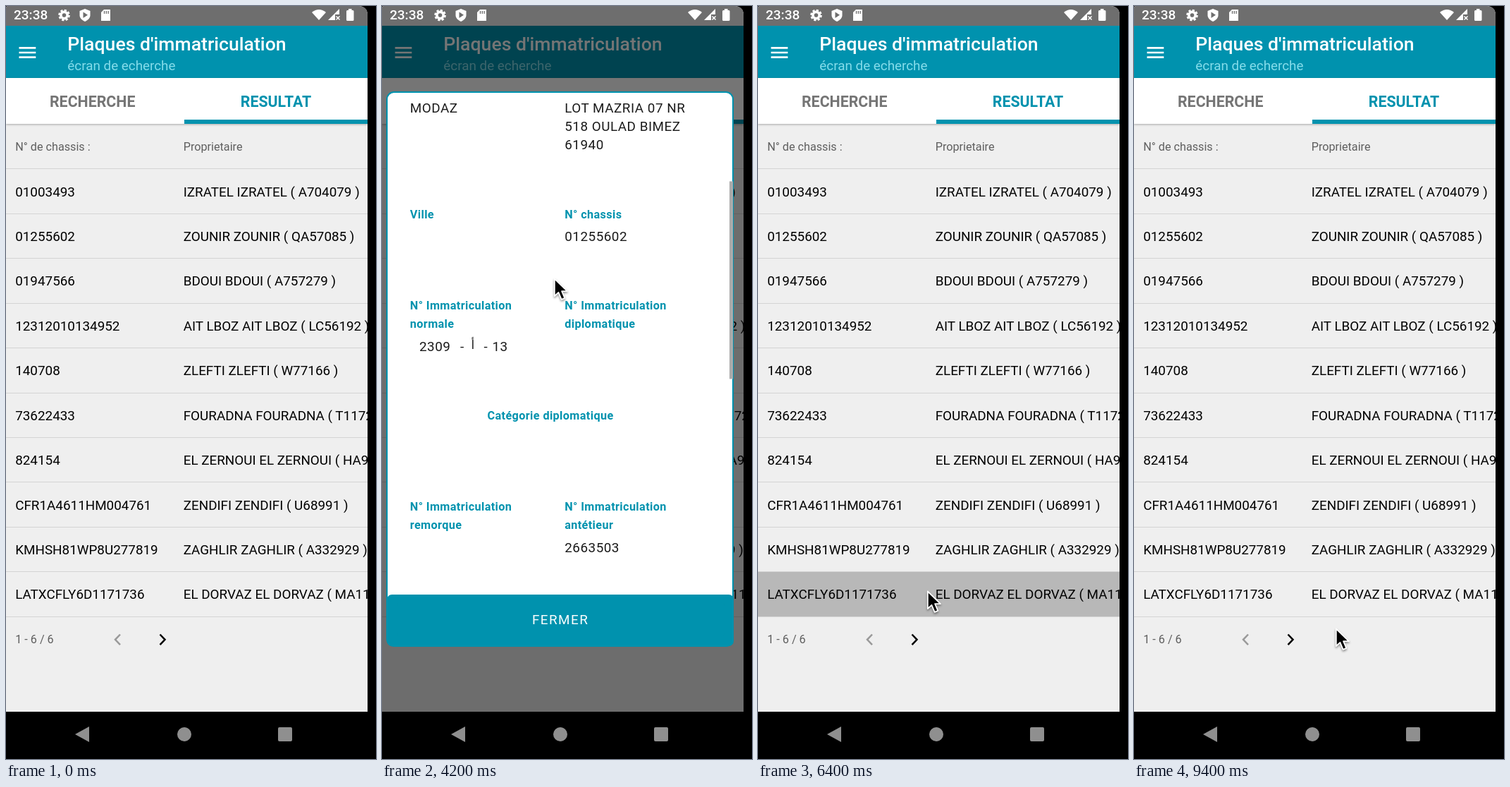
An HTML page for the animation above (9.5 s loop, 525 by 1067 pixels).

```html
<!DOCTYPE html>
<html lang="fr">
<head>
<meta charset="utf-8">
<title>Plaques d'immatriculation</title>
<style>
:root { --teal: #0092ae; }
html, body { margin: 0; width: 100%; height: 100%; overflow: hidden; background: #000; }
body { position: relative; font: 18.85px/26px Roboto, "DejaVu Sans", sans-serif; color: #000; }
div, span, svg { position: absolute; }
span { white-space: pre; line-height: 26px; }
svg { left: 0; top: 0; overflow: visible; }
#screen { left: 0; top: 0; width: 513px; height: 1000px; overflow: hidden; background: #efefef; border-radius: 3px 12px 0 0; }
#status { left: 0; top: 0; width: 513px; height: 28px; background: #6e6e6e; }
#bar { left: 0; top: 28px; width: 513px; height: 74px; background: var(--teal); }
#tabs { left: 0; top: 102px; width: 513px; height: 65px; background: #fff; box-shadow: 0 1px 3px rgba(0,0,0,.3); }
#ink { left: 253px; top: 161px; width: 260px; height: 6px; background: var(--teal); }
.clock { font-size: 19px; font-weight: 500; color: #fff; }
.title { font-size: 26.6px; font-weight: 500; color: #fff; }
.sub { color: #84dcea; }
.tab { font-size: 21.35px; font-weight: 700; color: #757575; }
.on { color: var(--teal); }
.small { font-size: 16.2px; color: #5f5f5f; }
.line { left: 0; width: 513px; height: 1px; background: #d4d4d4; }
.press { left: 0; width: 513px; height: 64px; background: rgba(0,0,0,.23); opacity: 0; }
.shade { left: 0; top: 28px; width: 513px; height: 972px; background: rgba(0,0,0,.54); }
.panel { left: 6px; top: 121px; width: 493px; height: 787px; box-sizing: border-box; border: 2px solid var(--teal); border-radius: 11px; background: #fff; }
.view { left: 8px; top: 122px; width: 491px; height: 713px; overflow: hidden; }
.body { left: -8px; top: -122px; width: 513px; height: 1805px; color: #1a1a1a; letter-spacing: .52px; }
.label { font-size: 16.2px; font-weight: 700; letter-spacing: .4px; color: var(--teal); }
.alef { font-family: "DejaVu Sans", sans-serif; font-size: 17px; }
.thumb { left: 485px; top: 1px; width: 5px; height: 280px; background: #ababab; }
.foot { left: 7px; top: 834px; width: 492px; height: 73px; border-radius: 7px; background: var(--teal); }
.btn { left: 21px; top: 845px; width: 465px; height: 49px; border-radius: 5px; background: var(--teal); }
.btn span { left: 192px; top: 11.5px; color: #fff; letter-spacing: 1.45px; }
.fade { opacity: 0; }
#cursor { filter: drop-shadow(0 2px 1.5px rgba(0,0,0,.4)); opacity: 0; }
</style>
</head>
<body>
<div id="screen">
  <div id="status"></div>
  <div id="bar"></div>
  <div id="tabs"></div>
  <div id="ink"></div>
  <svg width="513" height="1000">
    <g fill="#fff">
      <g fill="none" stroke="#fff">
        <circle cx="82.5" cy="13" r="4.6" stroke-width="3.6"/>
        <circle cx="82.5" cy="13" r="7" stroke-width="2.6" stroke-dasharray="3.2 2.3"/>
      </g>
      <path d="M112 4l7.5 3v6c0 4-3 7-7.5 9c-4.5-2-7.5-5-7.5-9V7z"/>
      <path d="M109.5 8.5v8.5l6.5-4.25z" fill="#6e6e6e"/>
      <path d="M139 5h9v16h-13V9z"/>
      <path d="M139.5 7v4m2.8-4v4m2.8-4v4" stroke="#6e6e6e" stroke-width="1.3"/>
      <path d="M434 9Q444 1 454 9L444 20z"/>
      <path d="M473 4v8h-6v8h-10z"/>
      <path d="M468.5 14.5l5 5m0-5l-5 5" stroke="#fff" stroke-width="1.5"/>
      <path d="M486 4h4.5v2h1.500q1.5 0 1.5 1.5v12q0 1.5-1.5 1.5h-7.5q-1.5 0-1.5-1.5v-12q0-1.5 1.5-1.5h1.500z"/>
    </g>
    <path d="M18.5 59.4h23.8m-23.8 6.6h23.8m-23.8 6.6h23.8" stroke="#fff" stroke-width="2.6"/>
    <g fill="none" stroke-width="2.5">
      <path d="M162 890.5l-7 7.3l7 7.3" stroke="#999"/>
      <path d="M218.5 890.5l7 7.3l-7 7.3" stroke="#000"/>
    </g>
  </svg>
</div>
<svg width="525" height="1067">
  <g fill="#8f8f8f">
    <path d="M98 1032l20-11v22z"/>
    <circle cx="253" cy="1032" r="10"/>
    <rect x="386" y="1022" width="20" height="20" rx="2"/>
  </g>
</svg>
<svg id="cursor" width="24" height="36">
  <path d="M.8 1.5V26l5.6-5.2l4.3 10l4.6-2l-4.2-9.7h7.8z" stroke="#fff" stroke-width="1.8" stroke-linejoin="round"/>
</svg>
<script>
const LOOP = 9500;
const TEAL = '#0092ae', TEAL_LIT = '#00a6c2';
const screenEl = document.getElementById('screen');

function add(parent, tag, cls, text) {
  const el = document.createElement(tag);
  if (cls) el.className = cls;
  if (text) el.textContent = text;
  parent.append(el);
  return el;
}

// y is the middle of the line
function write(parent, text, x, y, cls) {
  const el = add(parent, 'span', cls, text);
  el.style.left = x + 'px';
  el.style.top = y - 13 + 'px';
}

// keys: [ms, value, easing?]; the picture advances every 100 ms
function play(el, prop, keys) {
  const all = [[0, keys[0][1]], ...keys, [LOOP, keys[keys.length - 1][1]]];
  el.animate(
    all.map(([t, v, easing = 'linear']) => ({ offset: t / LOOP, [prop]: v, easing })),
    { duration: LOOP, iterations: Infinity, easing: 'steps(95)', delay: -1 }
  );
}

const moveY = y => `translateY(${y}px)`;

write(screenEl, '23:38', 11, 13, 'clock');
write(screenEl, "Plaques d'immatriculation", 87.3, 54, 'title');
write(screenEl, 'écran de echerche', 87.3, 84.5, 'sub');
write(screenEl, 'RECHERCHE', 62, 136, 'tab');
write(screenEl, 'RESULTAT', 332.8, 136, 'tab on');

// list
const COL = [13.2, 251.7], ROW = 63.44;
const rows = [
  ['01003493', 'IZRATEL IZRATEL ( A704079 )'],
  ['01255602', 'ZOUNIR ZOUNIR ( QA57085 )'],
  ['01947566', 'BDOUI BDOUI ( A757279 )'],
  ['12312010134952', 'AIT LBOZ AIT LBOZ ( LC56192 )'],
  ['140708', 'ZLEFTI ZLEFTI ( W77166 )'],
  ['73622433', 'FOURADNA FOURADNA ( T117243 )'],
  ['824154', 'EL ZERNOUI EL ZERNOUI ( HA95120 )'],
  ['CFR1A4611HM004761', 'ZENDIFI ZENDIFI ( U68991 )'],
  ['KMHSH81WP8U277819', 'ZAGHLIR ZAGHLIR ( A332929 )'],
  ['LATXCFLY6D1171736', 'EL DORVAZ EL DORVAZ ( MA117649 )']
];

function pressRow(i, from, to) {
  const el = add(screenEl, 'div', 'press');
  el.style.top = Math.round(230.7 + i * ROW) + 'px';
  play(el, 'opacity', [[from - 100, 0], [from, 1], [to - 100, 1], [to, 0]]);
}
pressRow(1, 1900, 2500);
pressRow(9, 6300, 6700);

write(screenEl, 'N° de chassis :', COL[0], 200, 'small');
write(screenEl, 'Proprietaire', COL[1], 200, 'small');
for (let i = 0; i <= rows.length; i++) {
  add(screenEl, 'div', 'line').style.top = Math.round(230.4 + i * ROW) + 'px';
}
rows.forEach((row, i) => row.forEach((s, c) => write(screenEl, s, COL[c], 263.5 + i * ROW)));
write(screenEl, '1 - 6 / 6', COL[0], 898, 'small');

// detail sheets
const SIDE = [39.8, 259.2];

function field(body, col, y, label, value = []) {
  const labels = [].concat(label), values = [].concat(value);
  labels.forEach((s, i) => write(body, s, SIDE[col], y + i * 26.4, 'label'));
  const top = y + (labels.length - 1) * 26.4 + 31.6;
  values.forEach((s, i) => write(body, s, SIDE[col], top + i * 26.4));
}

// shown from open to close, each with a short fade
const fadeKeys = (open, close, mid) => [
  [open, 0], [open + 100, .25], [open + 200, .7], [open + 300, .93], [open + 400, 1],
  [close, 1], [close + 100, mid], [close + 200, mid / 3], [close + 300, 0]
];

function sheet(d, open, close, thumbFade, scroll) {
  const shade = add(screenEl, 'div', 'shade fade');
  const panel = add(screenEl, 'div', 'panel fade');
  const view = add(screenEl, 'div', 'view fade');
  const body = add(view, 'div', 'body');
  const thumb = add(view, 'div', 'thumb');
  const foot = add(screenEl, 'div', 'foot fade');
  const btn = add(screenEl, 'div', 'btn fade');
  const text = add(btn, 'span', 'fade', 'FERMER');

  field(body, 0, 172, 'Type propriétaire', 'morale');
  field(body, 1, 172, 'Type identifiant', 'CIN');
  field(body, 0, 301.5, 'Identifiant', d.id);
  field(body, 1, 301.5, 'Nom ou raison sociale', d.name);
  field(body, 0, 431, 'Prénom', 'MODAZ');
  field(body, 1, 431, 'Adresse', d.address);
  field(body, 0, 613.5, 'Ville');
  field(body, 1, 613.5, 'N° chassis', d.chassis);
  field(body, 0, 743, ['N° Immatriculation', 'normale']);
  field(body, 1, 743, ['N° Immatriculation', 'diplomatique']);
  const [num, zone, x] = d.plate;
  write(body, num, x[0], 801);
  write(body, '-', x[1], 801);
  write(body, 'أ', x[2], 798, 'alef');
  write(body, '-', x[3], 801);
  write(body, zone, x[4], 801);
  write(body, 'Catégorie diplomatique', 149.5, 899, 'label');
  field(body, 0, 1027.5, ['N° Immatriculation', 'remorque']);
  field(body, 1, 1027.5, ['N° Immatriculation', 'antétieur'], '2663503');
  field(body, 0, 1184, 'Type usage');
  field(body, 1, 1184, 'Genre', 'voiture');
  field(body, 0, 1313, 'Marque', 'TIRZ');
  field(body, 1, 1313, 'Type véhicule', '178002');
  field(body, 0, 1443, 'Puissance fiscale', '7');
  field(body, 1, 1443, 'Type carburant', 'diesel');
  field(body, 0, 1572, 'Poids vide', '1044');
  field(body, 1, 1572, 'Poids chargé', '0');

  for (const el of [shade, panel, view, btn, text]) play(el, 'opacity', fadeKeys(open, close, .63));
  play(foot, 'opacity', fadeKeys(open, close, .83));
  for (const el of [foot, btn]) {
    play(el, 'backgroundColor', [[close, TEAL], [close + 100, TEAL_LIT], [close + 300, TEAL_LIT], [close + 400, TEAL]]);
  }
  play(thumb, 'opacity', thumbFade);
  play(body, 'transform', scroll.map(([t, y, e]) => [t, moveY(-y), e]));
  play(thumb, 'transform', scroll.map(([t, y, e]) => [t, moveY(y * 712 / 1805), e]));
}

sheet({
  id: 'QA57085', name: 'ZOUNIR', chassis: '01255602',
  address: ['LOT MAZRIA 07 NR', '518 OULAD BIMEZ', '61940'],
  plate: ['2309', '13', [53, 111, 126.5, 144.5, 156.5]]
}, 2400, 5200,
  [[0, 1]],
  [[3700, 0, 'ease-in'], [4200, 318, 'cubic-bezier(.15,.6,.4,1)'], [4900, 838]]);

sheet({
  id: 'MA117649', name: 'EL DORVAZ', chassis: 'LATXCFLY6D1171736',
  address: ['DR ZORBATHA', 'GHZOUFA CLE D', 'ARDOMMEL 73820'],
  plate: ['48002', '55', [52.3, 120.5, 136, 154, 166.3]]
}, 6700, 8800,
  [[7900, 1], [8200, 0]],
  [[0, 0]]);

// pointer
const cursor = document.getElementById('cursor');
play(cursor, 'opacity', [[400, 0], [500, 1], [9400, 1]]);
play(cursor, 'transform', [
  [500, 500, 650, 'ease-in-out'],
  [1400, 370, 440, 'ease-out'],
  [1900, 280.5, 328],
  [3000, 280.5, 328, 'ease-in-out'],
  [3600, 247, 703],
  [3700, 247, 703, 'ease-in'],
  [4200, 244, 385, 'ease-in-out'],
  [4900, 245, 867],
  [5500, 245, 867, 'ease-in-out'],
  [6200, 240, 828],
  [6600, 240, 828, 'ease-in-out'],
  [7400, 285, 888],
  [7700, 285, 888, 'ease-in-out'],
  [8300, 286, 881]
].map(([t, x, y, e]) => [t, `translate(${x}px, ${y}px)`, e]));
</script>
</body>
</html>
```
